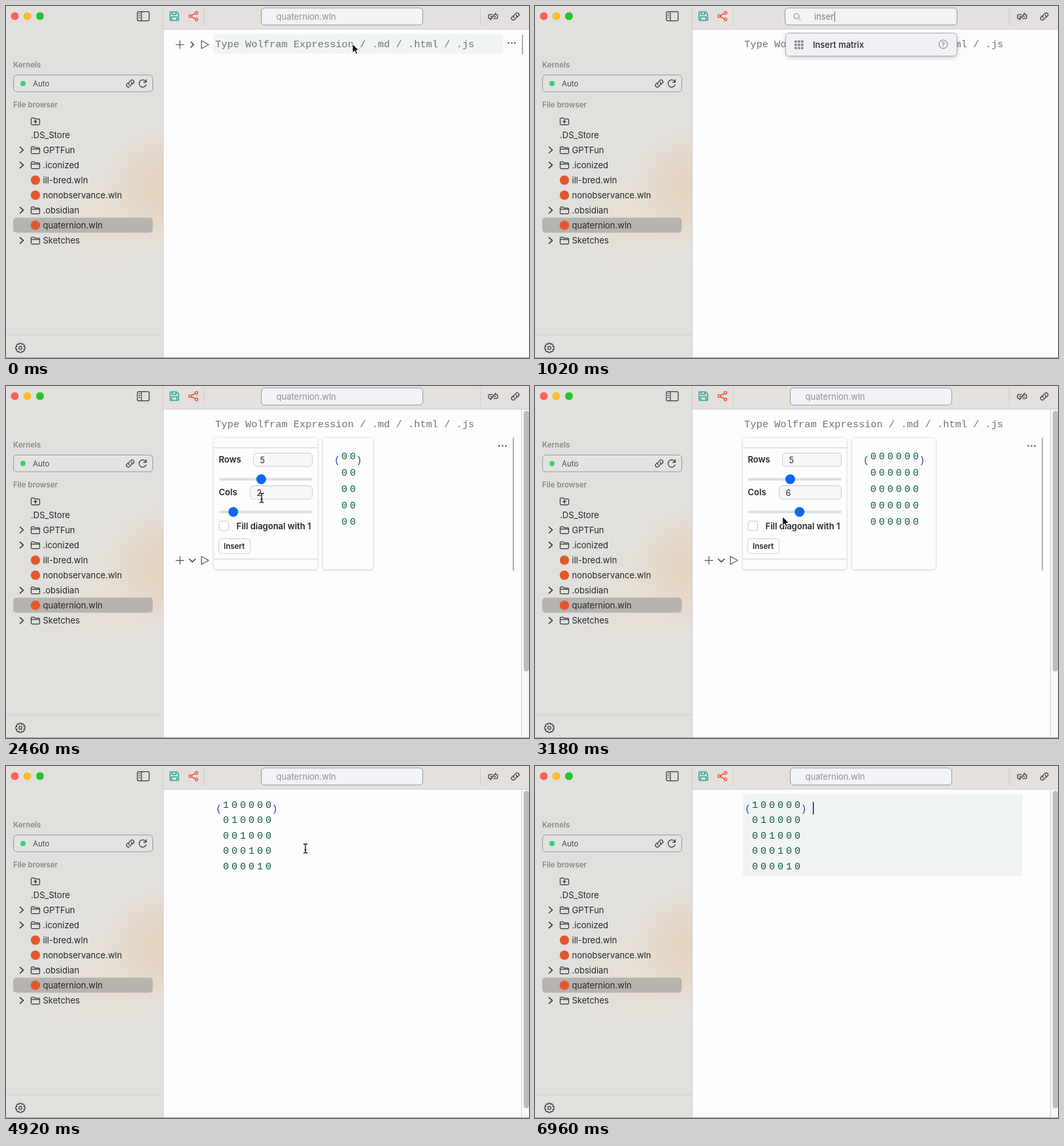
An HTML page for the animation above (7.02 s loop, 800 px wide and 538 px high).

```html
<!DOCTYPE html>
<html lang="en">
<head>
<meta charset="utf-8">
<style>
html, body { margin: 0; width: 100%; height: 100%; overflow: hidden; background: #fdfcff; }
svg { display: block; width: 800px; height: 538px; font: 13px Inter, sans-serif; fill: #232529; }
.icon { fill: none; stroke: #33363b; stroke-width: 1.25; stroke-linecap: round; stroke-linejoin: round; }
.mono { font-family: "Liberation Mono", monospace; }
.label { font-size: 11.5px; font-weight: 600; fill: #898785; }
.bold { font-weight: 600; }
.line { stroke: #cfcdcb; fill: none; }
.card { fill: #fdfdff; stroke: #e6e5e9; filter: drop-shadow(0 1px 1px #0002); }
.field { fill: #f6f7f9; stroke: #c8ccd2; }
</style>
</head>
<body>
<svg viewBox="0 0 800 538">
  <defs>
    <radialGradient id="peach">
      <stop offset="0" stop-color="#e6d1be"/><stop offset=".5" stop-color="#e5d5c6" stop-opacity=".7"/><stop offset="1" stop-color="#e3ddd6" stop-opacity="0"/>
    </radialGradient>
    <radialGradient id="cream">
      <stop offset="0" stop-color="#e8dfcf"/><stop offset=".5" stop-color="#e6dfd3" stop-opacity=".7"/><stop offset="1" stop-color="#e3e1de" stop-opacity="0"/>
    </radialGradient>
    <clipPath id="side"><path d="M0 0h240v538H0z"/></clipPath>
  </defs>
  <g id="frame"></g>
  <g id="work"></g>
</svg>
<script>
const LOOP = 7020;
const text = (x, y, s, attrs = '') => `<text x="${x}" y="${y}" ${attrs}>${s}</text>`;
const rect = (x, y, w, h, r = 0, attrs = '') => `<rect x="${x}" y="${y}" width="${w}" height="${h}" rx="${r}" ${attrs}/>`;
const dot = (x, y, r, fill) => `<circle cx="${x}" cy="${y}" r="${r}" fill="${fill}"/>`;
const icon = (x, y, d, attrs = '') => `<path class="icon" transform="translate(${x} ${y})" d="${d}" ${attrs}/>`;
const line = d => `<path class="line" d="${d}"/>`;

const LINK = 'M-1.5 2.2a2.8 2.8 0 0 1-.2-4L.9-4.6a2.8 2.8 0 0 1 4 4L3.5.8M1.5-2.2a2.8 2.8 0 0 1 .2 4L-.9 4.6a2.8 2.8 0 0 1-4-4L-3.5-.8';
const FOLDER = 'M-6.5-1.5v-2a1.5 1.5 0 0 1 1.5-1.5h2.8l1.7 1.6H5a1.5 1.5 0 0 1 1.5 1.5V4A1.5 1.5 0 0 1 5 5.5H-5A1.5 1.5 0 0 1-6.5 4V-1.5';
const CHEVRON = 'M-2.5-4.5 2.5 0-2.5 4.5';

function sidebar() {
  const rows = [['GPTFun', 1], ['.iconized', 1], ['ill-bred.wln'], ['nonobservance.wln'],
    ['.obsidian', 1], ['quaternion.wln'], ['Sketches', 1]];
  const files = rows.map(([name, folder], i) => {
    const y = 220 + i * 23.05;
    return (folder ? icon(24, y, CHEVRON, 'style="stroke-width:1.6"') + icon(45, y, FOLDER + 'H6.5')
      : dot(45, y, 7.2, '#e2582c')) + text(56.5, y + 4.7, name);
  }).join('');
  const gear = Array.from({ length: 8 }, (_, i) => {
    const p = (r, a) => (r * Math.cos(a)).toFixed(1) + ' ' + (r * Math.sin(a)).toFixed(1);
    const a = i * Math.PI / 4;
    return `${i ? 'L' : 'M'}${p(5.6, a - .42)}L${p(7.3, a - .22)}L${p(7.3, a + .22)}L${p(5.6, a + .42)}`;
  }).join('') + 'ZM2.3 0A2.3 2.3 0 1 1-2.3 0A2.3 2.3 0 1 1 2.3 0';
  return rect(0, 0, 240, 538, 0, 'fill="#e2e0dd"') +
    '<g clip-path="url(#side)">' +
    '<ellipse cx="195" cy="310" rx="165" ry="95" fill="url(#cream)" transform="rotate(-20 195 310)"/>' +
    '<ellipse cx="248" cy="275" rx="115" ry="105" fill="url(#peach)"/></g>' +
    dot(13.5, 15.5, 6, '#fe5f57') + dot(32.5, 15.5, 6, '#febc2e') + dot(52, 15.5, 6, '#28c131') +
    icon(210, 15.5, 'M-7-7H7a2 2 0 0 1 2 2V5a2 2 0 0 1-2 2H-7a2 2 0 0 1-2-2V-5a2 2 0 0 1 2-2M-3-7V7M-6.5-4h1M-6.5-1h1M-6.5 2h1') +
    text(11, 94, 'Kernels', 'class="label"') +
    rect(11.5, 105.5, 213, 25.5, 5, 'fill="#e8e6e4" fill-opacity=".6" stroke="#9298a1"') +
    dot(26, 118.5, 4, '#37d36f') + text(41, 122.5, 'Auto', 'font-size="11.5" fill="#45484d"') +
    icon(190, 118.5, LINK) + icon(209, 118.5, 'M5.2-2A5.5 5.5 0 1 0 5.2 2M5.5-6v4H1.5') +
    text(11, 155, 'File browser', 'class="label"') +
    icon(45, 176, FOLDER + 'M0 3.5v-4M-2 1 0-1 2 1') + text(38, 202, '.DS_Store') +
    rect(11, 323.5, 213.5, 23, 5, 'fill="#b7b3af"') + files +
    line('M0 502.5H240') + icon(22, 522.5, gear);
}

function toolbar() {
  return rect(240, 0, 560, 35, 0, 'fill="#e3e0de"') + line('M240.5 0V538M240 35.5H800M303.5 2V30M725.5 2V30') +
    icon(257.5, 15.5, 'M-6.5-5.5a1 1 0 0 1 1-1H3.5l3 3V5.5a1 1 0 0 1-1 1H-5.5a1 1 0 0 1-1-1zM-3.5-6.5v4H2.5v-4M-4 6.5V1H4V6.5', 'style="stroke:#27a78f;stroke-width:1.6"') +
    icon(286.5, 15.5, 'M-3-1 3-4M-3 1 3 4M-2.8 0a2 2 0 1 1-4 0a2 2 0 1 1 4 0M6.8-5a2 2 0 1 1-4 0a2 2 0 1 1 4 0M6.8 5a2 2 0 1 1-4 0a2 2 0 1 1 4 0', 'style="stroke:#ee523f;stroke-width:1.5"') +
    icon(745, 16, 'M-4 3H-5.500a1.500 1.500 0 0 1-1.500-1.500V-1.500A1.500 1.500 0 0 1-5.500-3H-1M4-3H5.500A1.500 1.500 0 0 1 7-1.500V1.500A1.500 1.500 0 0 1 5.500 3H1M-4 0H-2M2 0H4M-4 5 4-5'.replace(/00\b/g, '')) +
    icon(779, 16, LINK) + '<path d="M0 537.5H800" stroke="#9d9b9a"/>';
}

function searchBar(t) {
  const grow = 8 * Math.min(1, Math.max(0, (t - 600) / 120)) * (t < 1260);
  let s = rect(390.5 - grow, 3, 247 + grow * 2, 26, 5, 'fill="#f2f3f7" stroke="#8f96a3"');
  if (!grow) return s + text(413.5, 20.5, 'quaternion.wln', 'fill="#8d9097"');
  const typed = 'insert'.slice(0, Math.max(0, Math.floor((t - 720) / 60)));
  s += icon(401, 15.5, 'M3 0A4 4 0 1 1-5 0A4 4 0 1 1 3 0M2 3 5 6', 'style="stroke:#7d8189;stroke-width:1"') +
    `<text x="427" y="20.5" fill="#777a80">${typed}<tspan fill="#333" dx="-1" font-weight="300">|</tspan></text>`;
  if (!typed) return s;
  s += rect(383.5, 41.5, 262, 35, 5, 'fill="#f1f2f5" fill-opacity=".98" stroke="#a7abb3" style="filter:drop-shadow(0 2px 3px #0003)"');
  for (let i = 0; i < 9; i++) s += rect(397 + i % 3 * 5, 52.5 + Math.floor(i / 3) * 5, 3.6, 3.6, .5, 'fill="#85878c"');
  return s + text(425, 64, 'Insert matrix', 'font-weight="500"') +
    '<circle cx="624.5" cy="58.5" r="6.5" fill="none" stroke="#777a80"/>' +
    text(624.5, 62, '?', 'font-size="9.5" text-anchor="middle" fill="#666"');
}

function controls(y, top, height, right, expanded) {
  return icon(266, y, 'M-6 0H6M0-6V6', 'style="stroke:#55585d"') +
    icon(285, y, expanded ? 'M-4.5-2 0 2.5 4.5-2' : 'M-2-4 2 0-2 4', 'style="stroke-width:1.5"') +
    icon(304, y, 'M-5-6 6 0-5 6z', 'style="stroke:#55585d"') +
    [-5, 0, 5].map(d => dot(right - 16.5 + d, top + 12.5, 1.2, '#4c4f54')).join('') +
    rect(right - 1, top, 2, height, 0, 'fill="#aeadb2"');
}

function matrix(x, y, rows, cols, pitch, diagonal) {
  const paren = (px, s) => text(px, y + 6, s, 'fill="#2547b3"');
  let s = paren(x - 11, '(') + paren(x + 13 * cols - 3.5, ')');
  for (let i = 0; i < rows; i++)
    for (let j = 0; j < cols; j++) s += text(x + 13 * j, y + pitch * i, diagonal && i === j ? 1 : 0);
  return `<g class="mono" font-size="15" text-anchor="middle" fill="#12593a">${s}</g>`;
}

const valueAt = (t, start, end, from, to) =>
  Math.round(from + (to - from) * Math.min(1, Math.max(0, (t - start) / (end - start))));

function widget(t) {
  const loaded = t >= 1500;
  const rows = valueAt(t, 2100, 2340, 2, 5), cols = valueAt(t, 2640, 3060, 2, 6), checked = t >= 3420;
  const width = loaded ? 159 : 139, height = loaded ? 202 : 148, right = 310 + width;
  const slider = (label, value, y, x) => text(325.5, y + 4.7, label, 'class="bold"') +
    rect(x + .5, y - 9.5, right - x - 1, 20.5, 5, 'class="field"') + text(x + 10.5, y + 5.5, value, 'font-size="12.5"') +
    rect(326, y + 28.5, right - 326, 4, 2, 'fill="#dedee2"') +
    dot(333.5 + (right - 341) / 9 * (value - 1), y + 30.5, 7.5, '#0768fb');
  let s = rect(right + 15.5, 78.5, 77 + 13 * (cols - 2), height, 5, 'class="card"') +
    matrix(right + (loaded ? 48.5 : 49.5), 111.5, rows, cols, 25, checked);
  if (!loaded) {
    const done = Math.min(428, 300 + (t - 1440) * 2.5);
    s += rect(318, 78, 428, 4, 2, 'fill="#dfdee1"') + rect(318, 78, done, 4, 2, 'fill="#478878"');
  }
  s += rect(317.5, 78.5, width + .5, height, 5, 'class="card"') + line(`M318 94.5h${width}M318 ${62.5 + height}h${width}`) +
    slider('Rows', rows, 112, 378) + slider('Cols', cols, 162, 373);
  if (loaded) {
    s += checked
      ? rect(323, 203.5, 21, 21, 5, 'fill="#fdfdff" stroke="#3845b5" stroke-width="2"') + rect(326, 206.5, 15, 15, 3, 'fill="#404fd5"') +
        icon(333.5, 214, 'M-4 0-1 3 4-3', 'style="stroke:#fff;stroke-width:1.7"')
      : rect(326, 206.5, 14.5, 14.5, 3, 'fill="#fff" stroke="#c8c8ce"');
    s += text(352.5, 218.7, 'Fill diagonal with 1', 'class="bold" font-size="13"') +
      rect(325.5, 233.5, 48, 22.5, 4, 'fill="#fff" stroke="#cfcfd4"') + text(333, 249, 'Insert', 'class="bold" font-size="11.5"');
  }
  return s + (t >= 1860 ? controls(266.5, 79, 203, 776, true) : '');
}

// Pointer waypoints: time, x, y, shape on arrival
const route = [[0, 530, 58, 'arrow'], [420, 500, 12, 'arrow'], [660, 500, 12, 'arrow'],
  [1740, 580, 340, 'arrow'], [2040, 346, 142, 'arrow'], [2100, 346, 142, 'arrow'], [2340, 390, 142, 'arrow'],
  [2460, 391, 171, 'beam'], [2580, 348, 192, 'arrow'], [2640, 348, 192, 'arrow'], [3060, 404, 192, 'arrow'],
  [3360, 333, 214, 'arrow'], [3540, 333, 214, 'arrow'], [3840, 351, 241, 'hand'], [4620, 351, 241, 'hand'],
  [4920, 458, 126, 'beam'], [5400, 458, 126, 'beam'], [5940, 428, 66, 'beam'], [6180, 428, 66, 'beam'], [6540, 440, -18, 'arrow']];
const shapes = {
  arrow: '<path d="M0 0V13.5L3.2 10.6 5.4 15.5 7.7 14.5 5.6 9.7H10z" fill="#111" stroke="#fff"/>',
  beam: '<path d="M-3-7Q0-7 0-5Q0-7 3-7M0-5V5M-3 7Q0 7 0 5Q0 7 3 7M-1.5 2h3" fill="none" stroke="#111" stroke-width="1.3"/>',
  hand: '<path d="M-1 1Q0-.5 1.2 1V6Q3 4.5 4 6Q6 5 6.8 7Q9 6.5 9 9V12Q8.5 14 7.5 16H1.5Q-.5 13-4 9Q-3.5 7-1 9z" fill="#fff" stroke="#111" stroke-width="1.2"/>'
};

function pointer(t) {
  if (t > 660 && t < 1740 || t >= 6540) return '';
  const i = Math.max(1, route.findIndex(p => p[0] > t)), a = route[i - 1], b = route[i];
  const u = (t - a[0]) / (b[0] - a[0]), e = u * u * (3 - 2 * u);
  return `<g transform="translate(${a[1] + (b[1] - a[1]) * e} ${a[2] + (b[2] - a[2]) * e})">${shapes[u > .6 ? b[3] : a[3]]}</g>`;
}

function work(t) {
  const inserted = t >= 4680, focused = t >= 6060;
  let s = '';
  if (t >= 1380) {
    const thumb = inserted ? 485 : t < 1500 ? 436 : 398;
    s += rect(789, 36, 11, 501, 0, 'fill="#f8f7f9"') + line('M788.5 36V537') + rect(792, 38, 8, thumb, 4, 'fill="#bdbcbf"');
  }
  if (!inserted) {
    if (t < 300) s += rect(318, 43, 442, 30, 0, 'fill="#f0f4f4"') + controls(59, 44, 30, 790);
    s += text(320, 63, 'Type Wolfram Expression / .md / .html / .js', 'class="mono" font-size="15.36" fill="#717275"');
    if (t >= 1380) s += widget(t);
  } else {
    if (focused) s += rect(318, 43, 428, 125, 0, 'fill="#f0f4f4"') + rect(425, 55, 1.5, 19, 0, 'fill="#222"');
    s += matrix(336.5, 64, 5, 6, 23.4, true);
    if (focused && t < 6420) s += controls(153, 44, 124, 776);
  }
  return s + searchBar(t) + pointer(t);
}

document.getElementById('frame').innerHTML = sidebar() + toolbar();
const stage = document.getElementById('work');
const start = performance.now();
function draw() {
  stage.innerHTML = work(Math.max(0, performance.now() - start) % LOOP);
  requestAnimationFrame(draw);
}
draw();
</script>
</body>
</html>
```
